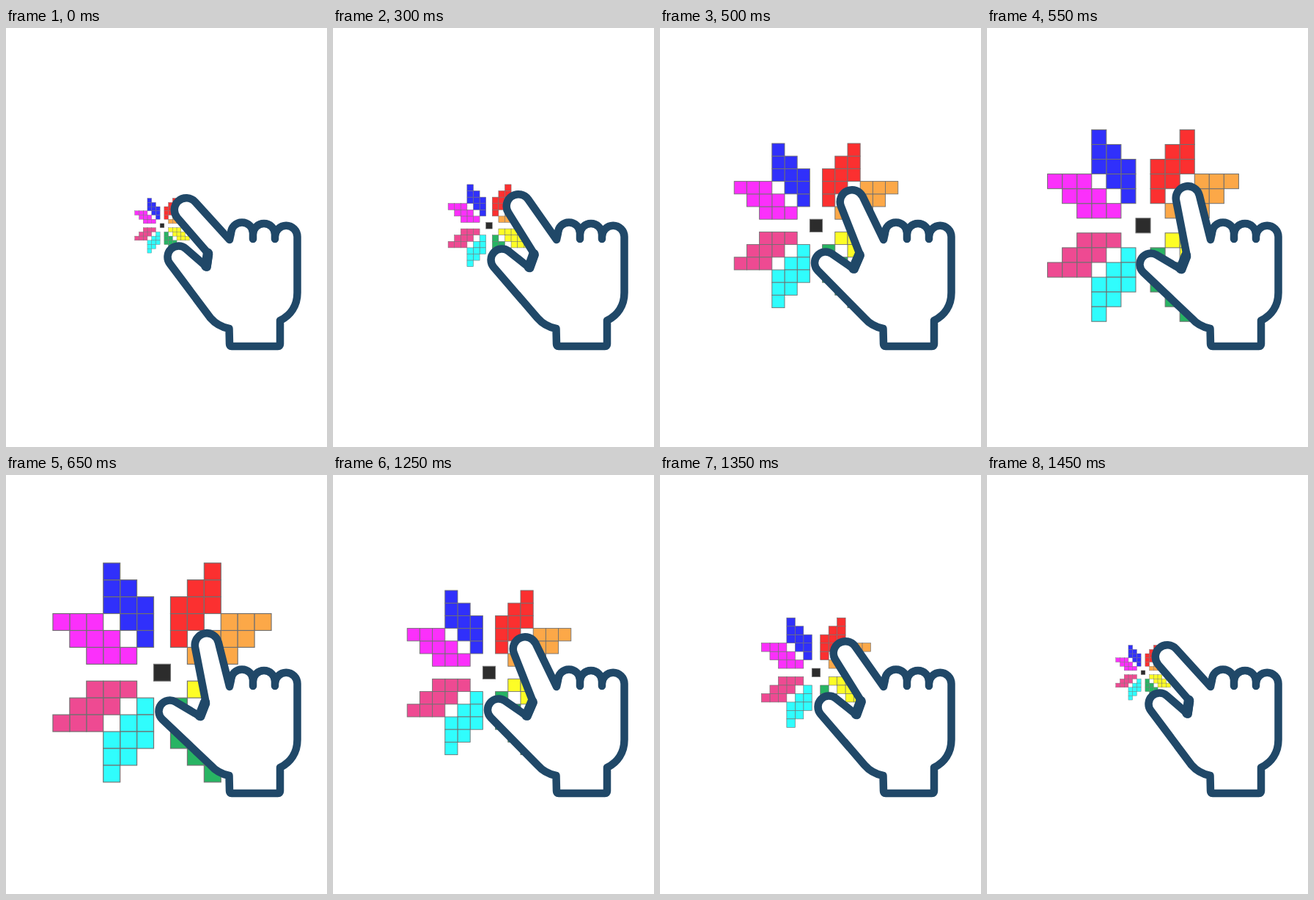
An HTML page for the animation above (1.55 s loop, 438 px wide and 570 px high).

```html
<!DOCTYPE html>
<html lang="en">
<head>
<meta charset="utf-8">
<title>Pinch to zoom</title>
<style>
  html, body { margin: 0; width: 100%; height: 100%; overflow: hidden; background: #fff; }
  svg { display: block; width: 100%; height: 100%; }
</style>
</head>
<body>
<svg viewBox="0 0 438 570">
  <g id="star" stroke="#707070"></g>
  <g stroke="#204868" stroke-linejoin="round" stroke-linecap="round">
    <path id="hand" fill="#fff" stroke-width="10.5"/>
    <path id="web" fill="none" stroke-width="13.5" transform="translate(-1.5 -1.5)"/>
  </g>
</svg>
<script>
const LOOP = 1550;
const CELL = 22.93;
const star = document.getElementById('star');
const hand = document.getElementById('hand');
const web = document.getElementById('web');

// [start ms, star scale]
const steps = [
  [0, .25], [300, .375], [400, .5], [450, .625], [500, .75], [550, .875], [650, 1],
  [1250, .75], [1300, .625], [1350, .5], [1400, .375], [1450, .25]
];

// Tip centres and the two corners of the web between the fingers
const poses = [
  { index: [246, 247.5], thumb: [235.5, 311.5], webTop: [277, 308], webLow: [274.5, 325.5] },
  { index: [253, 242.5], thumb: [230.5, 315.5], webTop: [275.5, 309], webLow: [269, 327] },
  { index: [262, 236.5], thumb: [226, 319.5], webTop: [273.5, 310], webLow: [265.5, 328.5] },
  { index: [274, 231.5], thumb: [223.5, 321.5], webTop: [273, 311], webLow: [266, 329] }
];

// [colour, x side, y side, lies flat]
const petals = [
  ['#3030fb', -1, -1, false], ['#fb30fb', -1, -1, true],
  ['#fb3030', 1, -1, false], ['#fca848', 1, -1, true],
  ['#ee4a92', -1, 1, true], ['#30fdfd', -1, 1, false],
  ['#fdfd26', 1, 1, true], ['#28b463', 1, 1, false]
];

function addCell(x, y, fill) {
  const rect = document.createElementNS('http://www.w3.org/2000/svg', 'rect');
  const attrs = { x: (x - .5) * CELL, y: (y - .5) * CELL, width: CELL, height: CELL, fill };
  for (const name in attrs) rect.setAttribute(name, attrs[name]);
  star.append(rect);
}

for (const [fill, sx, sy, flat] of petals) {
  for (let a = 1; a <= 3; a++) {
    for (let b = a + 1; b <= a + 3; b++) {
      addCell(sx * (flat ? b : a), sy * (flat ? a : b), fill);
    }
  }
}
addCell(0, 0, '#2c2c2c');

// Rounded fingertip joined by tangents to the points before and after it
function fingertip([cx, cy], r, from, to) {
  const tangent = ([x, y], side) => {
    const dx = x - cx, dy = y - cy;
    return Math.atan2(dy, dx) + side * Math.acos(r / Math.hypot(dx, dy));
  };
  const at = a => `${(cx + r * Math.cos(a)).toFixed(2)} ${(cy + r * Math.sin(a)).toFixed(2)}`;
  const a = tangent(from, 1), b = tangent(to, -1);
  const turn = (b - a + 4 * Math.PI) % (2 * Math.PI);
  return `L${at(a)}A${r} ${r} 0 ${turn > Math.PI ? 1 : 0} 1 ${at(b)}L${to}`;
}

function handPath({ index, thumb, webTop, webLow }) {
  const heel = [279, 394.5], knuckle = [305, 288];
  return `M${heel}` +
    fingertip(thumb, 15, heel, webLow) +
    `L${webTop}` +
    fingertip(index, 16.25, webTop, knuckle) +
    'L307 279A15 14.5 0 0 1 337 279V287V281A15 15 0 0 1 367 281V287V284' +
    'A15.25 15.25 0 0 1 397.5 284V360C397.5 378 388 391 374 398V430Q374 433 371 433' +
    'H308Q305 433 305 430L304.5 409Q289 406 279 394.5Z';
}

const shapes = poses.map(pose => ({
  hand: handPath(pose),
  web: `M${pose.webTop}L${pose.webLow}`
}));
let shown = null;

function draw(t) {
  const step = steps.findLast(([start]) => start <= t);
  if (step === shown) return;
  shown = step;
  const scale = step[1];
  const shape = shapes[Math.ceil(scale * 4) - 1];
  star.setAttribute('transform', `translate(213 268.8) scale(${scale})`);
  star.setAttribute('stroke-width', (.15 + scale) / scale);
  hand.setAttribute('d', shape.hand);
  web.setAttribute('d', shape.web);
}

const began = performance.now();
function tick() {
  draw((performance.now() - began) % LOOP);
  requestAnimationFrame(tick);
}
tick();
</script>
</body>
</html>
```
